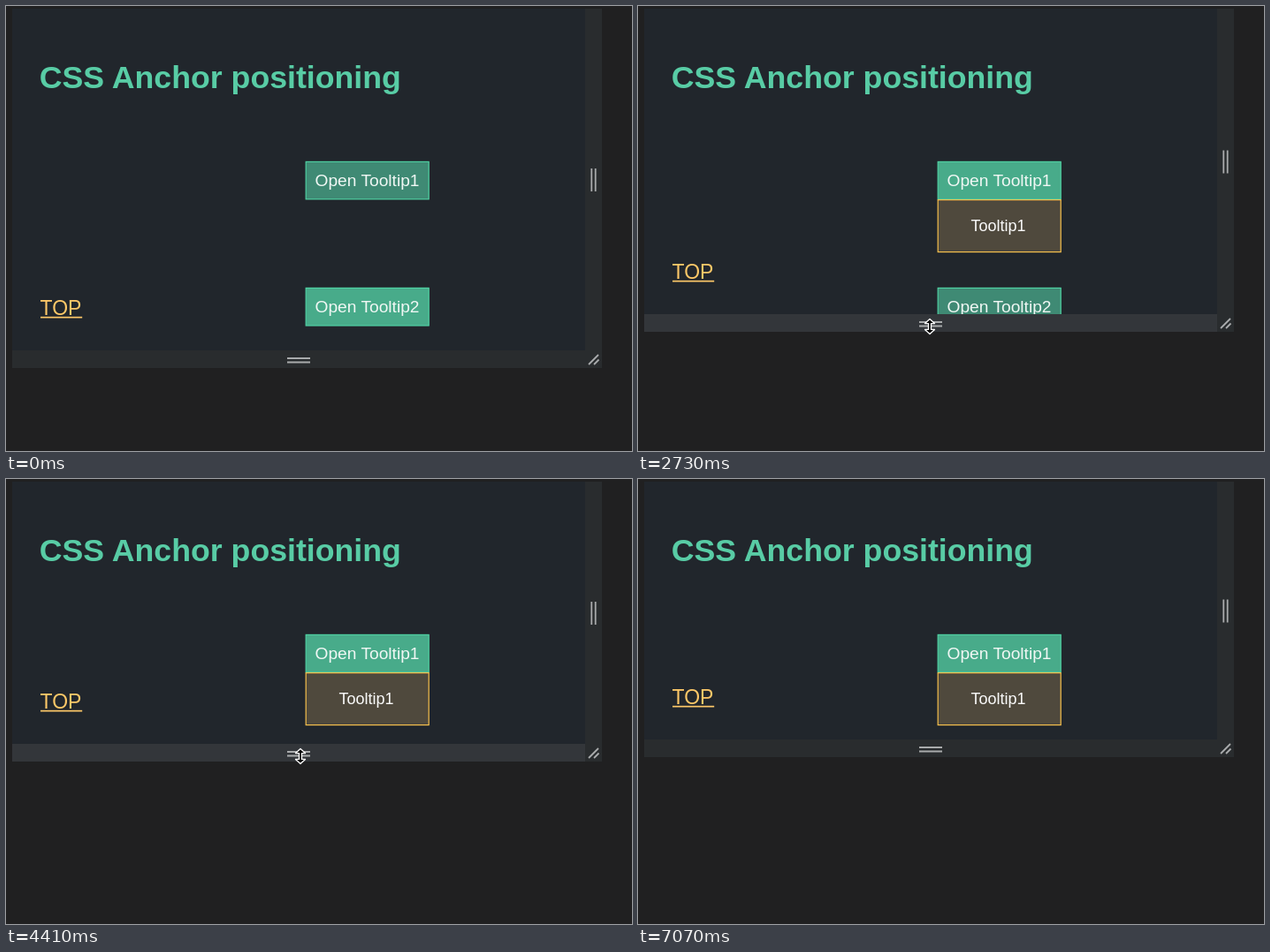
Animation of 708x504 px, one loop 7700 ms. Source, as an HTML page:

```html
<!DOCTYPE html>
<html lang="en">
<head>
<meta charset="utf-8">
<title>CSS Anchor positioning</title>
<style>
  html, body { margin: 0; width: 100%; height: 100%; overflow: hidden; background: #202021; }
  svg { display: block; width: 708px; height: 504px; }
  text { font-family: "Liberation Sans", Arial, sans-serif; }
  .title { font-size: 35.7px; font-weight: bold; fill: #58cca5; }
  .btn rect, .tip rect { stroke-width: 1.2; }
  .btn rect { fill: #3f8a74; stroke: #4fd1a3; }
  .btn.on rect { fill: #48ab8a; }
  .btn text { font-size: 19.2px; fill: #f0f7f4; text-anchor: middle; }
  .tip rect { fill: #4f493d; stroke: #f5c04d; }
  .tip text { font-size: 18px; fill: #fafafa; text-anchor: middle; }
  .link { font-size: 23px; fill: #fdc868; }
  .bar { fill: #292c2e; }
  .bar.on { fill: #33363a; }
  .grip { fill: none; stroke: #a9abac; stroke-width: 1.8; }
  .cursor path { fill: #000; stroke: #fff; stroke-width: 1.3; stroke-linejoin: round; }
</style>
</head>
<body>
<svg viewBox="0 0 708 504">
  <rect x="7" y="3" width="667" height="501" fill="#21262c"/>
  <text class="title" x="37.8" y="93">CSS Anchor positioning</text>

  <g class="btn" id="btn1">
    <rect x="339.2" y="176.4" width="139" height="42.4"/>
    <text x="408.5" y="204">Open Tooltip1</text>
  </g>
  <g class="btn" id="btn2">
    <rect x="339.2" y="319.4" width="139" height="42.6"/>
    <text x="408.5" y="347">Open Tooltip2</text>
  </g>
  <g class="tip" id="tip">
    <rect x="339.2" y=".6" width="139" height="59"/>
    <text x="407.5" y="36">Tooltip1</text>
  </g>

  <rect class="bar" x="655" y="3" width="19" height="501"/>
  <path class="grip" id="side" d="M662.3-13V13M666.7-13V13"/>

  <g id="foot">
    <rect width="708" height="504" fill="#202021"/>
    <text class="link" x="38.5" y="-60">TOP</text>
    <rect x="39" y="-58.2" width="47.2" height="1.7" fill="#fdc868"/>
    <rect class="bar" x="655" y="-20" width="19" height="20"/>
    <rect class="bar" id="bar" x="7" y="-20" width="648" height="20"/>
    <path class="grip" d="M318-11H344M318-6.5H344M659-4L670-15M665-4L670.5-9.5"/>
  </g>

  <g class="cursor" id="cursor">
    <path id="arrow" d="M.7.8V15.2L4 12.2L6.2 17.2L8.6 16.2L6.4 11.3H11Z"/>
    <path id="resize" d="M0-8.5L5.5-3.4H1.5V3.4H5.5L0 8.5L-5.5 3.4H-1.5V-3.4H-5.5Z"/>
  </g>
</svg>
<script>
const LOOP = 7700, STEP = 70;
const CLICK = 1260, DRAG = 2520, DROP = 6510, GONE = 7070;

const easeOut = k => 1 - (1 - k) ** 1.9;
const smooth = k => (1 - Math.cos(Math.PI * k)) / 2;
const phase = (t, from, to) => Math.min(1, Math.max(0, (t - from) / (to - from)));
const mix = (a, b, k) => a + (b - a) * k;
const curve = (a, c, b, k) => mix(mix(a, c, k), mix(c, b, k), k);

const $ = id => document.getElementById(id);
const place = (id, x, y) => $(id).setAttribute("transform", `translate(${x} ${y})`);
const show = (id, on) => $(id).setAttribute("visibility", on ? "visible" : "hidden");
const light = (id, on) => $(id).classList.toggle("on", on);

const drags = [
  { from: DRAG, to: 3570, bottom: 292, ease: easeOut },
  { from: 3780, to: 4410, bottom: 320, ease: smooth },
  { from: 4410, to: 5180, bottom: 288, ease: smooth },
  { from: 5390, to: 6300, bottom: 315, ease: smooth }
];

const panelBottom = t => Math.round(drags.reduce(
  (y, d) => mix(y, d.bottom, d.ease(phase(t, d.from, d.to))), 410));

function pointerAt(t, bottom) {
  if (t < CLICK) {
    const k = smooth(phase(t, STEP, 700));
    const sway = Math.sin(Math.PI * phase(t, 770, 1120));
    return [curve(55, 330, 451, k) - 65 * sway, curve(443, -170, 204, k) - 20 * sway];
  }
  if (t < DRAG) {
    const k = smooth(phase(t, CLICK, 2100));
    return [curve(451, 500, 328, k), curve(204, 270, 404, k)];
  }
  const away = phase(t, DROP, GONE) ** 2;
  return [328 + (410 - bottom) * .06, mix(bottom - 6, 515, away)];
}

function draw(t) {
  const bottom = panelBottom(t);
  const [x, y] = pointerAt(t, bottom).map(Math.round);
  const open = t >= CLICK;
  const onBar = open && y > bottom - 20 && y < bottom;

  light("btn1", open);
  light("btn2", !open);
  light("bar", onBar);

  // The tooltip flips above its button when it no longer fits below
  show("tip", open);
  place("tip", 0, bottom - 20 < 279 ? 116 : 219);

  place("foot", 0, bottom);
  place("side", 0, bottom / 2 - 8);

  place("cursor", x, y);
  show("arrow", t >= STEP && t < GONE && !onBar);
  show("resize", onBar);
}

const start = performance.now();
function tick() {
  const t = (performance.now() - start) % LOOP;
  draw(Math.floor(t / STEP) * STEP);
  requestAnimationFrame(tick);
}
draw(0);
requestAnimationFrame(tick);
</script>
</body>
</html>
```
